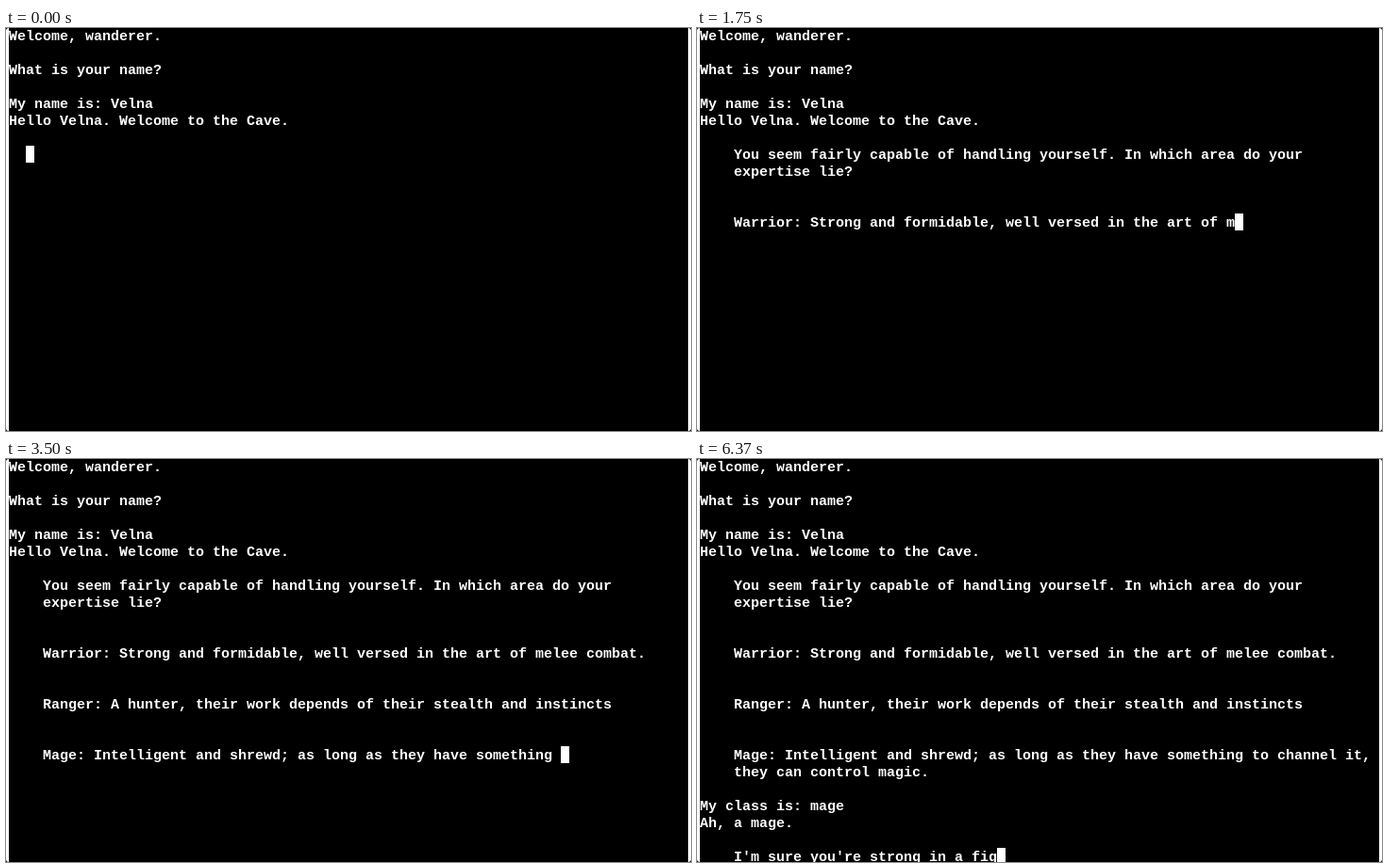
These frames come from a looping animation (726 by 428 pixels, 6.44 s). An HTML page with a canvas:

```html
<!DOCTYPE html>
<html lang="en">
<head>
<meta charset="utf-8">
<title>Cave adventure</title>
<style>
  html, body { margin: 0; width: 100%; height: 100%; overflow: hidden; background: #000; }
  canvas { display: block; }
</style>
</head>
<body>
<canvas id="screen" width="726" height="428"></canvas>
<script>
const canvas = document.getElementById("screen");
const ctx = canvas.getContext("2d");
const LOOP = 6440, TICK = 70;
const LEFT = 3, COLUMN = 9, ROW = 18, COLUMNS = 80;

const intro = `Welcome, wanderer.

What is your name?

My name is: Velna
Hello Velna. Welcome to the Cave.

`;

const gap = "\n    \n\n    ";
const story = "    You seem fairly capable of handling yourself. In which area do your\n" +
  "    expertise lie?" +
  gap + "Warrior: Strong and formidable, well versed in the art of melee combat." +
  gap + "Ranger: A hunter, their work depends of their stealth and instincts" +
  gap + "Mage: Intelligent and shrewd; as long as they have something to channel it,\n" +
  "    they can control magic.";

const prompt = "\n\nMy class is: ";
const answer = "mage";
const reply = "\nAh, a mage.\n\n    I'm sure you're strong in a fig";

// [tick, characters printed]
const storyPace = [[0, 2], [10, 66], [11, 72], [19, 124], [27, 173], [31, 200],
  [40, 254], [42, 268], [50, 322], [52, 334], [57, 364]];
const replyPace = [[84, 4], [91, 49]];
const promptTick = 58;
const keyTicks = [70, 74, 77, 79];

function printed(pace, tick) {
  if (tick < pace[0][0]) return 0;
  const next = pace.findIndex(([at]) => at > tick);
  if (next < 0) return pace[pace.length - 1][1];
  const [t0, n0] = pace[next - 1], [t1, n1] = pace[next];
  return Math.floor(n0 + (n1 - n0) * (tick - t0) / (t1 - t0));
}

function textAt(tick) {
  let text = intro + story.slice(0, printed(storyPace, tick));
  if (tick >= promptTick) text += prompt;
  text += answer.slice(0, keyTicks.filter(at => tick >= at).length);
  return text + reply.slice(0, printed(replyPace, tick));
}

function drawWindow() {
  ctx.clearRect(0, 0, canvas.width, canvas.height);
  ctx.fillStyle = "#fff";
  ctx.beginPath();
  ctx.roundRect(0, 0, canvas.width, canvas.height, 3);
  ctx.fill();
  ctx.fillStyle = "#000";
  ctx.fillRect(LEFT, 0, COLUMNS * COLUMN, canvas.height);
}

function draw(now) {
  const lines = textAt(Math.floor(now % LOOP / TICK)).split("\n");
  drawWindow();
  ctx.fillStyle = "#fff";
  ctx.font = "bold 15px 'Liberation Mono', 'Courier New', monospace";
  lines.forEach((line, row) => ctx.fillText(line, LEFT, row * ROW + 13));

  const last = lines.length - 1;
  ctx.fillRect(LEFT + lines[last].length * COLUMN, last * ROW - 1, COLUMN, ROW);
}

const start = performance.now();
function frame() {
  draw(performance.now() - start);
  requestAnimationFrame(frame);
}
frame();
</script>
</body>
</html>
```
